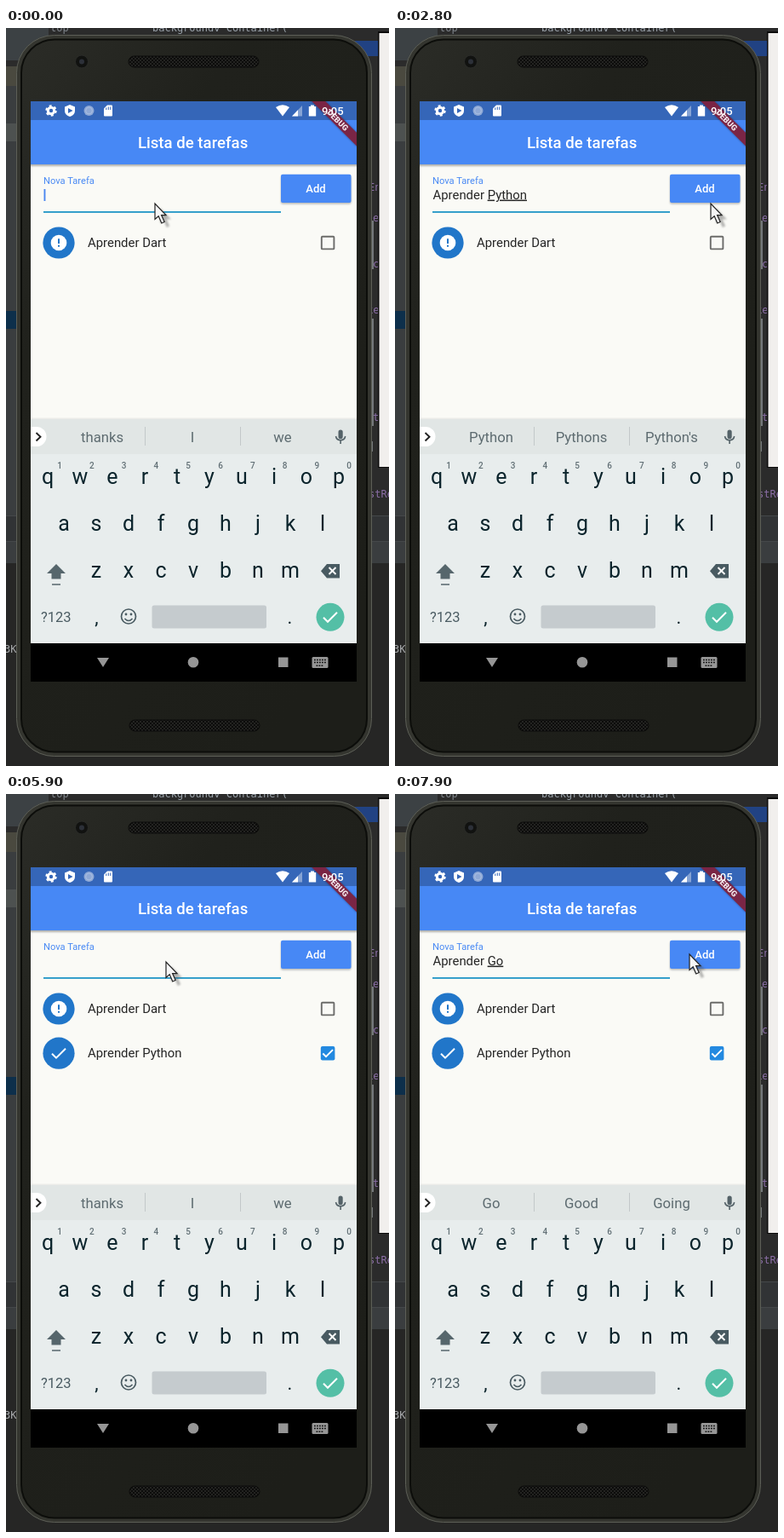
An HTML page for the animation above (8000 ms loop, 450 by 866 pixels).

```html
<!DOCTYPE html>
<html lang="pt">
<head>
<meta charset="utf-8">
<title>Lista de tarefas</title>
<style>
  html, body { margin: 0; width: 100%; height: 100%; overflow: hidden; background: #2b2b2b; }
  svg { display: block; width: 450px; height: 866px; }
  text { font-family: Roboto, sans-serif; white-space: pre; }
  .mid { text-anchor: middle; }
  .body { font-size: 14.9px; fill: #252525; }
  .composing { text-decoration: underline 1px #777; text-decoration-skip-ink: none; text-underline-offset: 2px; }
  .key { font-size: 25px; fill: #0b242c; }
  .hint { font-size: 10px; font-weight: 500; fill: #627076; }
  .word { font-size: 16.7px; fill: #5d6b70; }
  .code { font: 12px "DejaVu Sans Mono", monospace; fill: #8d6fa8; }
</style>
</head>
<body>
<svg viewBox="0 0 450 866">
  <defs>
    <linearGradient id="shell" x2=".7" y2="1">
      <stop offset="0" stop-color="#2b2c27"/><stop offset=".3" stop-color="#20211c"/>
      <stop offset="1" stop-color="#1d1e19"/>
    </linearGradient>
    <pattern id="mesh" width="4" height="4" patternUnits="userSpaceOnUse">
      <rect width="4" height="4" fill="#0c0c0b"/>
      <path d="M0 0L4 4M4 0L0 4" stroke="#292a27" stroke-width=".8"/>
    </pattern>
    <filter id="soft" x="-50%" y="-50%" width="200%" height="200%"><feGaussianBlur stdDeviation="1"/></filter>
    <clipPath id="screen"><rect x="29" y="86" width="383" height="681"/></clipPath>
    <path id="arrow" d="M0 0V18.5L4.2 14.8L7.8 23L11.2 21.5L7.6 13.6H13Z"/>
    <path id="tick" d="M-8 .5L-3 5.5L8 -5.5" fill="none" stroke="#fff" stroke-width="2"/>
    <circle id="avatar" r="18.6" fill="#2176c9"/>
    <g id="todo">
      <use href="#avatar"/><circle r="9.3" fill="#fff"/>
      <path d="M0 -4.8V1M0 2.8V4.8" stroke="#2176c9" stroke-width="2"/>
      <rect x="308.8" y="-7.2" width="14.6" height="14.6" rx="1" fill="none" stroke="#6c6c6a" stroke-width="1.9"/>
    </g>
    <g id="done">
      <use href="#avatar"/><use href="#tick"/>
      <rect x="307.8" y="-8.2" width="16.6" height="16.6" rx="2" fill="#2389e0"/>
      <path d="M310.3 .3L314 4L322 -4" fill="none" stroke="#fff" stroke-width="1.9"/>
    </g>
  </defs>

  <!-- editor behind the phone -->
  <rect width="450" height="866" fill="#2b2b2b"/>
  <rect width="50" height="38" fill="#3c4144"/>
  <rect y="45" width="50" height="23" fill="#4a493f"/>
  <rect y="68" width="13" height="504" fill="#3a3d3f"/>
  <rect y="112" width="13" height="21" fill="#4d5150"/>
  <rect y="332" width="13" height="21" fill="#0d2f4b"/>
  <rect x="400" y="15" width="38" height="18" fill="#214283"/>
  <text class="code" x="52" y="4" style="fill:#80868c">top</text>
  <text class="code" x="172" y="4" style="fill:#9aa2aa">backgroundv Container(</text>
  <text class="code" x="426" y="191">En</text><text class="code" x="431" y="227">e</text>
  <text class="code" x="431" y="281">c</text><text class="code" x="424" y="335">ke</text>
  <text class="code" x="431" y="461">t</text><text class="code" x="426" y="551">stRe</text>
  <path d="M431 226V283M431 341V467M430 485V497" stroke="#74777a" stroke-width="2"/>
  <rect y="573" width="450" height="29" fill="#313335"/>
  <rect y="603" width="450" height="25" fill="#3a3d3f"/>
  <path d="M0 572.5H450M0 602.5H450" stroke="#45484a"/>
  <rect y="628" width="450" height="238" fill="#262625"/>
  <text class="code" x="-2" y="733" style="fill:#a9abad">3K</text>
  <rect x="437" y="4" width="20" height="512" fill="#0b0b0b"/>
  <rect x="438.5" y="6" width="20" height="509" fill="#f1efed"/>

  <!-- phone shell -->
  <rect x="12.5" y="8.5" width="417" height="846" rx="44" fill="#34352f" stroke="#5d5f57"/>
  <rect x="18" y="13.5" width="406" height="836" rx="39" fill="url(#shell)" stroke="#0c0d0a" stroke-width="2"/>
  <rect x="144" y="33" width="153" height="13" rx="6.5" fill="url(#mesh)" stroke="#0b0b0a"/>
  <rect x="145" y="812" width="153" height="13" rx="6.5" fill="url(#mesh)" stroke="#0b0b0a"/>
  <circle cx="89" cy="39.5" r="7.5" fill="#111210" stroke="#2b2c29"/>
  <circle cx="89" cy="39.5" r="3" fill="#2c3038"/>

  <g clip-path="url(#screen)">
    <rect x="29" y="86" width="383" height="681" fill="#fafaf6"/>
    <rect x="25" y="150" width="391" height="12" opacity=".3" filter="url(#soft)"/>
    <rect x="29" y="108" width="383" height="52" fill="#4788f5"/>
    <rect x="29" y="86" width="383" height="22" fill="#3566b8"/>
    <text class="mid" x="219.6" y="141" font-size="18.6" font-weight="500" fill="#fff">Lista de tarefas</text>

    <!-- status icons -->
    <g fill="#fff">
      <circle cx="53" cy="97" r="3.7" fill="none" stroke="#fff" stroke-width="3"/>
      <circle cx="53" cy="97" r="5.7" fill="none" stroke="#fff" stroke-width="2" stroke-dasharray="2.9 3.07"/>
      <path d="M75 90L81 92.6V97C81 100.6 78.5 103 75 104C71.5 103 69 100.6 69 97V92.6Z"/>
      <path d="M73 94V100L78.5 97Z" fill="#3566b8"/>
      <circle cx="97.5" cy="97" r="6" fill="#8fa9d6"/>
      <circle cx="97.5" cy="97" r="3.8" fill="none" stroke="#a9bee2"/>
      <path d="M119 90.5H124Q125 90.5 125 91.5V102.5Q125 103.5 124 103.5H116Q115 103.5 115 102.5V94.5Z"/>
      <path d="M117.8 93.5V96M120.3 92.5V96M122.8 92.5V96" stroke="#3566b8"/>
      <path d="M317 93Q325 87.5 333 93L325 103.5Z"/>
      <path d="M336 103.5L348 91V103.5Z" opacity=".4"/><path d="M336 103.5L343 96.2V103.5Z"/>
      <path d="M358 90.5H362V92H364.2V103.5H355.8V92H358Z"/>
    </g>
    <g transform="translate(412 86) rotate(45)">
      <rect x="-38" y="26" width="76" height="11.2" opacity=".4" filter="url(#soft)"/>
      <rect x="-38" y="26" width="76" height="11.2" fill="#7f2342" opacity=".95"/>
      <text class="mid" y="34.7" font-size="9.5" font-weight="900" fill="#f3e8ec">DEBUG</text>
    </g>
    <text x="371" y="101.6" font-size="13" font-weight="500" fill="#fff">9:05</text>

    <!-- form -->
    <text x="44" y="182.6" font-size="11.17" fill="#4a8af4">Nova Tarefa</text>
    <text class="body" x="44.5" y="200.6"><tspan id="typed"></tspan><tspan id="composing" class="composing"></tspan></text>
    <rect id="caret" y="189" width="1.9" height="14" fill="#4a86f0"/>
    <rect x="44" y="215" width="279" height="1.9" fill="#2c9bc9"/>
    <rect x="323" y="173.5" width="82.5" height="33" rx="2" opacity=".27" filter="url(#soft)"/>
    <rect x="323" y="171.7" width="82.5" height="33.4" rx="2" fill="#4788f5"/>
    <rect id="press" x="323" y="171.7" width="82.5" height="33.4" rx="2" fill="#fff" opacity=".18"/>
    <text class="mid" x="364" y="193" font-size="13" font-weight="500" fill="#fff">Add</text>

    <!-- tasks -->
    <use href="#todo" x="62" y="252"/>
    <text class="body" x="96" y="257">Aprender Dart</text>
    <g id="task">
      <use id="mark" x="62" y="304.2"/>
      <text class="body" x="96" y="309.2">Aprender Python</text>
    </g>

    <!-- keyboard -->
    <rect x="29" y="457.5" width="383" height="2" opacity=".06"/>
    <rect x="29" y="459" width="383" height="263" fill="#e8eded"/>
    <rect x="29" y="459" width="383" height="41" fill="#e1e6e5"/>
    <path d="M29 468H36A11.5 11.5 0 0 1 36 491H29Z" fill="#fff"/>
    <path d="M35.5 475L40.5 479.7L35.5 484.5" fill="none" stroke="#222" stroke-width="1.9"/>
    <path d="M163.5 468V490M275.5 468V490" stroke="#c2c8c9"/>
    <g id="words"></g>
    <rect x="390.5" y="471.5" width="5.2" height="10.5" rx="2.6" fill="#546268"/>
    <path d="M387.5 479A5.7 5.7 0 0 0 398.7 479M393.1 484.5V488" fill="none" stroke="#546268" stroke-width="1.6"/>
    <g id="keys"></g>
    <path d="M59 629L70 640H64.5V646.5H53.5V640H48Z" fill="#56666c"/>
    <path d="M54 653H64" stroke="#56666c" stroke-width="1.5"/>
    <path d="M377 629H392V645.5H377L370 637.2Z" fill="#485a61"/>
    <path d="M379.5 633L387.5 641M387.5 633L379.5 641" stroke="#fff" stroke-width="1.9"/>
    <text x="41" y="697" font-size="16.5" fill="#4a5b62">?123</text>
    <text class="key mid" x="106.5" y="699" style="font-size:22px">,</text>
    <text class="key mid" x="333.5" y="699" style="font-size:22px">.</text>
    <g fill="none" stroke="#4a5b62" stroke-width="1.7">
      <circle cx="144" cy="690.5" r="8.5"/><path d="M139.5 693Q144 698 148.5 693"/>
    </g>
    <circle cx="141" cy="688" r="1.4" fill="#4a5b62"/><circle cx="147" cy="688" r="1.4" fill="#4a5b62"/>
    <rect x="171.5" y="677.5" width="134.5" height="27" rx="2.5" fill="#c5cbce"/>
    <circle cx="381" cy="691.3" r="16.5" fill="#54bfa6"/>
    <use href="#tick" x="381" y="691.3"/>

    <!-- navigation bar -->
    <rect x="29" y="722" width="383" height="45"/>
    <g fill="#969696">
      <path d="M107 739H121L114 750Z"/><circle cx="220" cy="744.3" r="6.3"/>
      <rect x="320" y="738.5" width="11.5" height="11.5"/>
      <rect x="359.5" y="738" width="19" height="13" rx="1.5"/>
    </g>
    <path d="M362 741.5H376M362 744.5H376M364.5 748.2H373.5" stroke="#111" stroke-width="1.5" stroke-dasharray="1.8 1.2"/>
  </g>

  <g id="mouse">
    <use href="#arrow" x="6" y="5" fill="#555" opacity=".42" filter="url(#soft)"/>
    <use href="#arrow" fill="#f6f6f6" stroke="#222" stroke-width="1.2"/>
  </g>
</svg>
<script>
const LOOP = 8000;
const $ = id => document.getElementById(id);

function addText(parent, content, x, y, cls) {
  const node = document.createElementNS('http://www.w3.org/2000/svg', 'text');
  node.setAttribute('x', x);
  node.setAttribute('y', y);
  node.setAttribute('class', cls + ' mid');
  node.textContent = content;
  return parent.appendChild(node);
}

[['qwertyuiop', 49], ['asdfghjkl', 68], ['zxcvbnm', 106]].forEach(([row, x], r) =>
  [...row].forEach((letter, i) => addText($('keys'), letter, x + i * 38, 535.3 + r * 55, 'key')));
[...'1234567890'].forEach((digit, i) => addText($('keys'), digit, 63 + i * 37.8, 517, 'hint'));
const words = [113, 219, 325].map(x => addText($('words'), '', x, 486, 'word'));

// Each entry: time, committed text, word being composed, suggestions (* = bold)
const idle = 'thanks I we';
const typeVerb = (start, resume) => [
  [start, '', 'A', 'A And At'],
  [start + 100, '', 'Ap', 'Ap App April'],
  [start + 200, '', 'Apr', 'Apr April Apron'],
  [start + 300, '', 'Apre', 'Apre *Apr Apres'],
  [start + 400, '', 'Apren', 'Apren *Aprender Apron'],
  [resume, '', 'Aprend', 'Aprend *Aprender Apren'],
  [resume + 100, '', 'Aprende', 'Aprende *Aprender Aprend'],
  [resume + 200, 'Aprender ', '', 'to and in']
];
const typing = [
  [0, '', '', idle],
  ...typeVerb(300, 900),
  [1400, 'Aprender ', 'P', 'P Please Per'],
  [1500, 'Aprender ', 'Py', 'Py My Pay'],
  [1700, 'Aprender ', 'Pyt', 'Pyt Put Python'],
  [1900, 'Aprender ', 'Pyth', 'Pyth Python Pythons'],
  [2100, 'Aprender ', 'Python', "Python Pythons Python's"],
  [3000, '', '', idle],
  ...typeVerb(6000, 6600),
  [7000, 'Aprender ', 'G', 'G Good Great'],
  [7100, 'Aprender ', 'Go', 'Go Good Going']
];

// Pointer samples: time, x, y (no position = hidden)
const pointer = [
  [0, 175, 206], [2400], [2600, 391, 222], [2800, 371, 206], [2900, 364, 196], [3000, 362, 190],
  [3200, 366, 196], [3300, 376, 230], [3400, 387, 285], [3500, 393, 324], [3700, 391, 312],
  [3800, 386, 303], [4000, 383, 299], [4300, 380, 298], [4900, 310, 318], [5000, 80, 157],
  [5200, 130, 172], [5300, 170, 188], [5400, 188, 197], [7400, 187, 199], [7500, 210, 204],
  [7600, 250, 203], [7700, 298, 198], [7800, 332, 192], [7900, 346, 188]
];

const caretOff = [[2600, 3000], [3500, 4000], [4500, 5000], [5900, 6000], [7600, LOOP]];

const latest = (list, t) => list.findLast(entry => entry[0] <= t);
const within = (t, [from, to]) => t >= from && t < to;
const show = (id, visible) => $(id).setAttribute('visibility', visible ? 'visible' : 'hidden');

let current;
function render(t) {
  const state = latest(typing, t);
  if (state !== current) {
    current = state;
    const [, done, composing, suggestions] = state;
    $('typed').textContent = done;
    $('composing').textContent = composing;
    suggestions.split(' ').forEach((word, i) => {
      words[i].textContent = word.replace('*', '');
      words[i].setAttribute('font-weight', word[0] === '*' ? 700 : 400);
    });
  }
  const width = $('typed').parentNode.getComputedTextLength();
  $('caret').setAttribute('x', 44.5 + width);
  show('caret', !caretOff.some(span => within(t, span)));
  show('press', within(t, [3000, 3200]));
  show('task', t >= 3000);
  $('mark').setAttribute('href', t >= 4700 ? '#done' : '#todo');

  const [, x, y] = latest(pointer, t);
  show('mouse', x !== undefined);
  if (x !== undefined) $('mouse').setAttribute('transform', `translate(${x} ${y})`);
}

const start = performance.now();
function tick() {
  render((performance.now() - start) % LOOP);
  requestAnimationFrame(tick);
}
tick();
</script>
</body>
</html>
```
